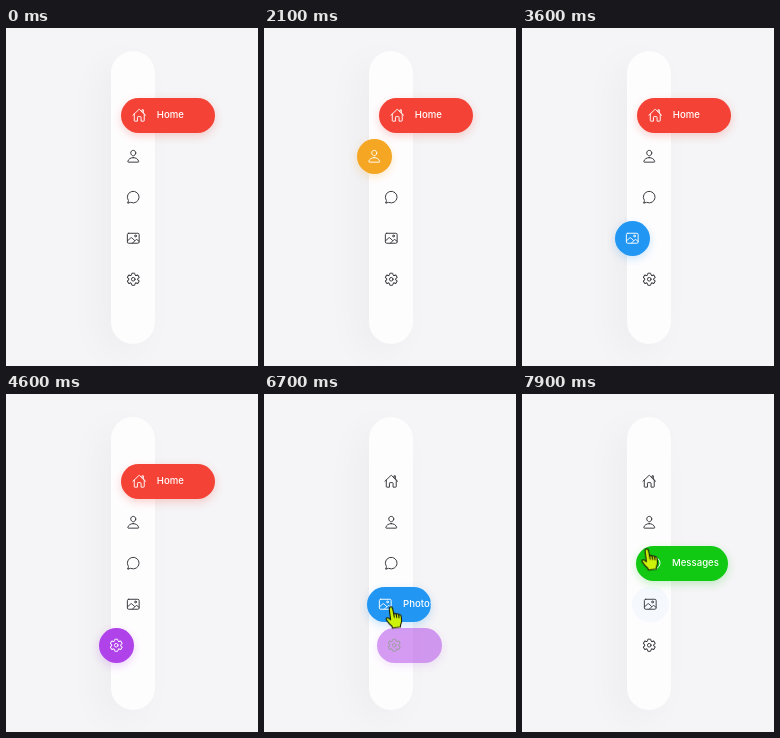
Animation of 252x338 px, one loop 8000 ms. Source, as an HTML page:

```html
<!DOCTYPE html>
<html lang="en">
<head>
<meta charset="utf-8">
<title>Side menu</title>
<style>
  /* --h: hovered, --on: selected */
  @property --h { syntax: "<number>"; inherits: true; initial-value: 0; }
  @property --on { syntax: "<number>"; inherits: true; initial-value: 0; }

  html, body { margin: 0; width: 100%; height: 100%; overflow: hidden; background: #f5f4f6; }
  body { position: relative; }

  .bar {
    position: absolute; left: 105.3px; top: 23px; width: 43.7px; height: 293px;
    border-radius: 22px; background: #fefdfe;
    box-shadow: -12px 10px 36px rgba(0, 0, 0, .035);
  }

  .item {
    --lit: calc(var(--h) + var(--on));
    position: absolute;
    top: calc(69.8px + 41px * var(--i));
    left: calc(109.7px - 17px * var(--h) + 5.5px * var(--on));
    width: calc(35px + 59px * var(--on));
    height: 35px;
    color: color-mix(in srgb, #fff calc(100% * var(--lit)), #303035);
    animation: 8s ease infinite;
  }
  .item::before {
    content: ""; position: absolute; inset: 0; border-radius: 17.5px;
    background: var(--c); opacity: var(--lit);
    box-shadow: 0 3px 8px color-mix(in srgb, var(--c) 24%, transparent);
  }
  .clip { position: absolute; inset: 0; overflow: hidden; border-radius: 17.5px; }
  .clip svg {
    position: absolute; left: 10.7px; top: 10px; width: 14.5px; height: 14.5px; overflow: visible;
    fill: none; stroke: currentColor; stroke-width: 33; stroke-linejoin: round; stroke-linecap: round;
  }
  .label {
    position: absolute; left: 35.6px; top: -.4px; white-space: nowrap;
    font: 500 9.6px/35px Inter, "Open Sans", sans-serif; color: #fff;
    animation: 8s step-end infinite;
  }

  .home { --i: 0; --c: #f44336; animation-name: home; }
  .user { --i: 1; --c: #f5a623; animation-name: user; }
  .chat { --i: 2; --c: #11c813; animation-name: chat; }
  .photo { --i: 3; --c: #2196f3; animation-name: photo; }
  .gear { --i: 4; --c: #af42e9; animation-name: gear; }
  .home .label { animation-name: home-label; }
  .chat .label { animation-name: chat-label; }
  .photo .label { animation-name: photo-label; }
  .gear .label { animation-name: gear-label; }

  @keyframes home {
    0%, 69.25% { --on: 1; }
    75.5%, 100% { --on: 0; }
  }
  @keyframes user {
    0%, 16.125% { --h: 0; }
    22.375%, 27.375% { --h: 1; }
    33.625%, 100% { --h: 0; }
  }
  @keyframes chat {
    0%, 27.5% { --h: 0; --on: 0; }
    33.75%, 38.875% { --h: 1; --on: 0; }
    45.125%, 89.75% { --h: 0; --on: 0; }
    94.5% { --h: 1; --on: 0; }
    100% { --h: .01; --on: .99; }
  }
  @keyframes photo {
    0%, 39% { --h: 0; --on: 0; }
    45.25%, 51.625% { --h: 1; --on: 0; }
    57.875%, 76.875% { --h: 0; --on: 0; }
    82% { --h: 1; --on: 0; }
    88.25%, 94.5% { --h: 0; --on: 1; }
    100% { --h: 0; --on: .01; }
  }
  @keyframes gear {
    0%, 51.625% { --h: 0; --on: 0; }
    57.875%, 69.25% { --h: 1; --on: 0; }
    75.5%, 82% { --h: 0; --on: 1; }
    88.25%, 100% { --h: 0; --on: 0; }
  }

  @keyframes home-label { 0% { opacity: 1; } 69.25%, 100% { opacity: 0; } }
  @keyframes gear-label { 0% { opacity: 0; } 69.25% { opacity: 1; } 82%, 100% { opacity: 0; } }
  @keyframes photo-label { 0% { opacity: 0; } 82% { opacity: 1; } 94.5%, 100% { opacity: 0; } }
  @keyframes chat-label { 0% { opacity: 0; } 94.5%, 100% { opacity: 1; } }

  .hand {
    position: absolute; left: 0; top: 0; width: 1px; height: 1px; overflow: visible;
    fill: #cdf30a; stroke: #1c1f08; stroke-width: 1.1; stroke-linejoin: round; stroke-linecap: round;
    animation: move 8s ease-in-out infinite, appear 8s step-end infinite;
  }
  @keyframes move {
    0%, 74.4% { transform: translate(120.3px, 249.5px); }
    78.1%, 86.9% { transform: translate(127px, 213.3px); }
    90.6%, 100% { transform: translate(124.8px, 155.3px); }
  }
  @keyframes appear { 0% { opacity: 0; } 68.3%, 100% { opacity: 1; } }
</style>
</head>
<body>
  <div class="bar"></div>

  <div class="item home"><div class="clip">
    <svg viewBox="0 0 512 512"><path d="M80 212V448Q80 464 96 464H192V328Q192 304 216 304H296Q320 304 320 328V464H416Q432 464 432 448V212M480 256 267 52Q256 44 245 52L32 256M400 179V64H352V133"/></svg>
    <span class="label">Home</span>
  </div></div>

  <div class="item user"><div class="clip">
    <svg viewBox="0 0 512 512"><path d="M344 144C340 197 300 240 256 240S172 197 168 144C164 89 203 48 256 48S348 90 344 144ZM256 304C169 304 81 352 64 443 62 454 69 464 80 464H432C443 464 450 454 448 443 431 352 343 304 256 304Z"/></svg>
  </div></div>

  <div class="item chat"><div class="clip">
    <svg viewBox="0 0 512 512"><path d="M66 452 87 380Q90 372 81 361A206 204 0 1 1 172 438Q160 433 148 438L80 463Q62 466 66 452Z"/></svg>
    <span class="label">Messages</span>
  </div></div>

  <div class="item photo"><div class="clip">
    <svg viewBox="0 0 512 512">
      <rect x="48" y="80" width="416" height="352" rx="48"/>
      <circle cx="336" cy="176" r="32"/>
      <path d="M304 336 213 245Q192 228 169 244L48 352M224 432 347 309Q368 290 390 307L464 368"/>
    </svg>
    <span class="label">Photos</span>
  </div></div>

  <div class="item gear"><div class="clip">
    <svg viewBox="-256 -256 512 512">
      <path id="tooth" d="M-80-138.5-69-145Q-62-149-60-157L-53.5-205Q-52-214-43-214H43Q52-214 53.5-205L60-157Q62-149 69-145L80-138.5"/>
      <use href="#tooth" transform="rotate(60)"/>
      <use href="#tooth" transform="rotate(120)"/>
      <use href="#tooth" transform="rotate(180)"/>
      <use href="#tooth" transform="rotate(240)"/>
      <use href="#tooth" transform="rotate(300)"/>
      <circle r="64"/>
    </svg>
    <span class="label">Settings</span>
  </div></div>

  <svg class="hand">
    <path d="M-1.8 1.5C-1.8-.9 1.2-.9 1.6 1.2L2.8 7C3 5.8 5 5.8 5.3 7.3 5.6 6.1 7.5 6.3 7.8 8 8.2 7 10 7.2 10.2 9L10.6 13C10.8 15.5 9.6 16.5 9.4 18.5V19.8L1.5 20.8 1 19C-1 17.5-3 15-4.6 12.6-5.6 10.8-3.6 9.8-2.2 11L-.4 12.4Z"/>
    <path fill="none" d="M2.8 7 3.3 10M5.3 7.3 5.7 10.2M7.8 8 8 10.5"/>
  </svg>
</body>
</html>
```
